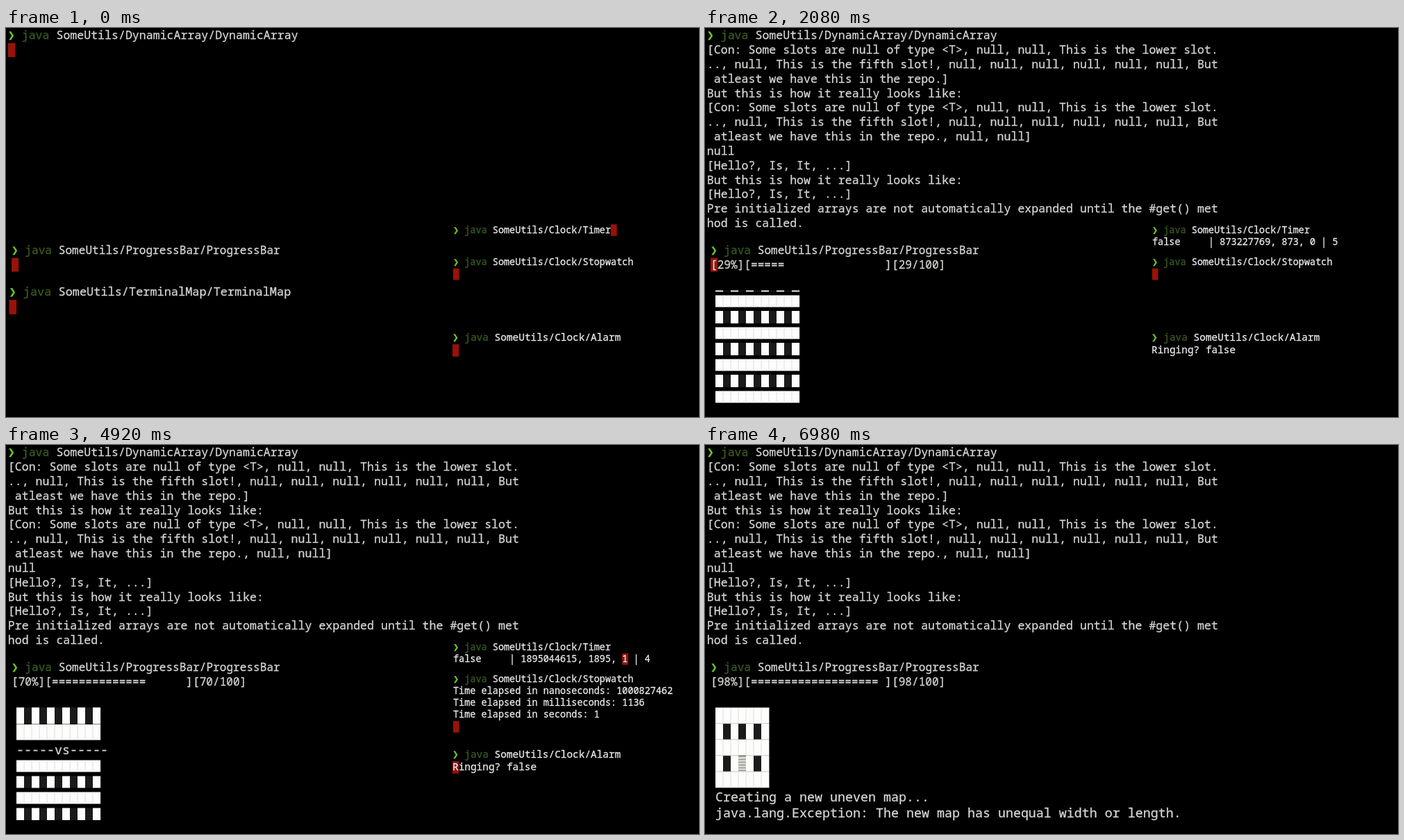
These frames come from a looping animation (998 by 561 pixels, 7.08 s). An HTML page:

```html
<!DOCTYPE html>
<html lang="en">
<head>
<meta charset="utf-8">
<title>Terminal utilities</title>
<style>
html, body { margin: 0; width: 100%; height: 100%; overflow: hidden; background: #000; }
svg { display: block; width: 100vw; height: 100vh; filter: blur(0.5px); }
text { font-family: "Noto Sans Mono", "DejaVu Sans Mono", monospace; fill: #d3d6d1; stroke: #d3d6d1; stroke-width: 0.3px; white-space: pre; }
.bright text { fill: #ececec; stroke: #ececec; }
text.mark { font-family: "DejaVu Sans Mono", monospace; font-weight: bold; fill: #6cc72f; stroke: #6cc72f; }
text.command { fill: #395a20; stroke: #395a20; }
.cursor { fill: #981208; }
</style>
</head>
<body>
<svg id="stage" viewBox="0 0 998 561" preserveAspectRatio="none"></svg>
<script>
const LOOP = 7080;
const stage = document.getElementById('stage');

// Terminal panes: left edge, centre of the first line, line pitch, character advance.
const panes = {
  array:  { x: 2.8, y: 10.5, line: 20.83, adv: 9.95 },
  bar:    { x: 8, y: 320, line: 21, adv: 9.68 },
  map:    { x: 4.5, y: 380, line: 22, adv: 10.15 },
  board:  { x: 15, y: 371, line: 23, adv: 11 },
  timer:  { x: 644, y: 291, line: 17.2, adv: 8.11 },
  watch:  { x: 644, y: 337.5, line: 17.1, adv: 8.11 },
  alarm:  { x: 643, y: 446.5, line: 18, adv: 8.66 }
};

const arrayLines = [
  '[Con: Some slots are null of type <T>, null, null, This is the lower slot.',
  '.., null, This is the fifth slot!, null, null, null, null, null, null, But',
  ' atleast we have this in the repo.]',
  'But this is how it really looks like:',
  '[Con: Some slots are null of type <T>, null, null, This is the lower slot.',
  '.., null, This is the fifth slot!, null, null, null, null, null, null, But',
  ' atleast we have this in the repo., null, null]',
  'null',
  '[Hello?, Is, It, ...]',
  'But this is how it really looks like:',
  '[Hello?, Is, It, ...]',
  'Pre initialized arrays are not automatically expanded until the #get() met',
  'hod is called.'
];
const watchLines = [
  'Time elapsed in nanoseconds: 1000827462',
  'Time elapsed in milliseconds: 1136',
  'Time elapsed in seconds: 1'
];

const progressKeys = [[130, 0], [820, 10.3], [2080, 29.2], [3100, 43.3], [4920, 70.2], [5760, 82.3], [6980, 98.5]];
const timerKeys = [[900, 4127316], [2080, 873227769], [3100, 1340476385], [4920, 1895044615], [5760, 2480721615], [7080, 3262418307]];

function valueAt(keys, t, step = 1) {
  let i = 0;
  while (i < keys.length - 2 && t >= keys[i + 1][0]) i++;
  const [t0, v0] = keys[i], [t1, v1] = keys[i + 1];
  const held = Math.floor((t - t0) / step) * step;
  return v0 + (v1 - v0) * Math.min(1, held / (t1 - t0));
}

const escapeText = s => s.replace(/&/g, '&amp;').replace(/</g, '&lt;');
const rect = (x, y, w, h, fill) => `<rect x="${x}" y="${y}" width="${w}" height="${h}" fill="${fill}"/>`;

function write(pane, row, string, col = 0, cls = '') {
  const size = pane.adv / 0.6;
  const x = pane.x + col * pane.adv, y = pane.y + row * pane.line + size * 0.345;
  return `<text class="${cls}" x="${x.toFixed(2)}" y="${y.toFixed(2)}" font-size="${size.toFixed(2)}">${escapeText(string)}</text>`;
}
const writeLines = (pane, lines) => lines.map((line, i) => write(pane, i + 1, line)).join('');

function cursor(pane, row, col = 0) {
  const h = pane.adv * 2.05;
  return `<rect class="cursor" x="${pane.x + col * pane.adv}" y="${pane.y + row * pane.line + 0.5 - h / 2}" width="${pane.adv + 0.5}" height="${h}"/>`;
}

const prompt = (pane, path) =>
  write(pane, 0, '❯', 0, 'mark') + write(pane, 0, 'java', 2, 'command') + write(pane, 0, 'SomeUtils/' + path, 7);

// One board row; odd columns stay dark unless the row is full or lists them as filled.
function boardRow(y, h, cols, full, filled = []) {
  let out = '';
  for (let c = 0; c < cols; c++) {
    const white = full || c % 2 === 0 || filled.includes(c);
    out += rect(15 + c * 11, y, 11.1, h, white ? '#fdfdfc' : '#1a1a1a');
    if (full && c) out += rect(14.7 + c * 11, y, 0.7, h, '#d2d2d2');
  }
  return out;
}
const fullRow = row => boardRow(385.5 + (row - 1) * 23, 17, 11, true);
const cellRow = row => boardRow(408 + (row - 2) * 23, 18, 11, false);

function gridBoard(moved) {
  let out = boardRow(378.5, 1.8, 11, false, moved ? [5] : []);
  for (let row = 1; row <= 7; row++) {
    if (moved && row === 6) out += write(panes.board, 5.95, "Moving 'occupied' to coords {2, 4}");
    else out += row % 2 ? fullRow(row) : cellRow(row);
  }
  return out;
}

function versusBoard() {
  return boardRow(378.5, 24, 11, false) + boardRow(403, 22.5, 11, true) +
    write(panes.board, 3, '-----vs-----') +
    fullRow(4) + boardRow(477.5, 17, 11, false) + fullRow(6) + boardRow(523.5, 17.5, 11, false);
}

function unevenBoard() {
  let out = rect(15, 378.5, 77.5, 116, '#b5b5b0');
  for (let row = 0; row < 5; row++) out += boardRow(379 + row * 23.1, 22.3, 7, row % 2 === 0);
  out += rect(48, 449, 11, 22, '#d4d4cb');
  for (let y = 453; y < 470; y += 4) out += rect(48, y, 11, 1, '#8f9086');
  return out + write(panes.board, 5.95, 'Creating a new uneven map...') +
    write(panes.board, 6.95, 'java.lang.Exception: The new map has unequal width or length.');
}

function drawArray(t) {
  const shown = t < 560 ? 0 : t < 860 ? 4 : arrayLines.length;
  return (t < 860 ? cursor(panes.array, 1) : '') + prompt(panes.array, 'DynamicArray/DynamicArray') +
    writeLines(panes.array, arrayLines.slice(0, shown));
}

function drawBar(t) {
  const phase = (t + 1390) % 1030;
  let out = t < 130 || phase > 320 ? cursor(panes.bar, 1) : '';
  out += prompt(panes.bar, 'ProgressBar/ProgressBar');
  if (t >= 130) {
    const percent = Math.floor(valueAt(progressKeys, t));
    const fill = '='.repeat(Math.floor(percent / 5)).padEnd(20);
    out += write(panes.bar, 1, `[${percent}%][${fill}][${percent}/100]`);
  }
  return out;
}

function drawMap(t) {
  if (t >= 5950) return unevenBoard();
  if (t >= 3600) return versusBoard();
  if (t >= 1100) return gridBoard(t >= 2600);
  const rows = t < 400 ? 0 : 2;
  let out = cursor(panes.map, rows + 1) + prompt(panes.map, 'TerminalMap/TerminalMap');
  for (let r = 0; r < rows; r++) {
    for (let c = 0; c < 5; c++)
      out += rect(14.5 + c * 30.45, 392 + r * 21.5, 10, 20, r && c > 1 ? '#151526' : '#20201f');
    out += write(panes.map, r + 1, '[ ,  ,  ,  ,  ]');
  }
  return out;
}

function drawTimer(t, lit) {
  const { timer } = panes;
  let out = '';
  if (t < 120) out += cursor(timer, 0, 28);
  else if (t < 900) out += cursor(timer, 1, 12);
  else if (lit && t > 2500) out += cursor(timer, 1, 30);
  out += prompt(timer, 'Clock/Timer');
  if (t >= 120) {
    let line = 'false     | ';
    if (t >= 900) {
      const nanos = Math.floor(valueAt(timerKeys, t, 47));
      const seconds = Math.floor(nanos / 1e9);
      line += `${nanos}, ${Math.floor(nanos / 1e6)}, ${seconds} | ${5 - seconds}`;
    }
    out += write(timer, 1, line);
  }
  return out;
}

function drawWatch(t) {
  const done = t >= 3150;
  let out = prompt(panes.watch, 'Clock/Stopwatch');
  if (t < 3000 || done) out += cursor(panes.watch, done ? 4 : 1);
  return done ? out + writeLines(panes.watch, watchLines) : out;
}

function drawAlarm(t, lit) {
  return (lit ? cursor(panes.alarm, 1) : '') + prompt(panes.alarm, 'Clock/Alarm') +
    (t >= 300 ? write(panes.alarm, 1, 'Ringing? false') : '');
}

function render(t) {
  const lit = t < 1850 || (t - 1850) % 1840 > 780;
  const clocks = t < 6970 ? drawTimer(t, lit) + drawWatch(t) + drawAlarm(t, lit) : '';
  return drawArray(t) + drawBar(t) + drawMap(t) + `<g class="bright">${clocks}</g>`;
}

const start = performance.now();
let shownMarkup = '';
function tick() {
  const markup = render((performance.now() - start) % LOOP);
  if (markup !== shownMarkup) stage.innerHTML = shownMarkup = markup;
  requestAnimationFrame(tick);
}
tick();
</script>
</body>
</html>
```
